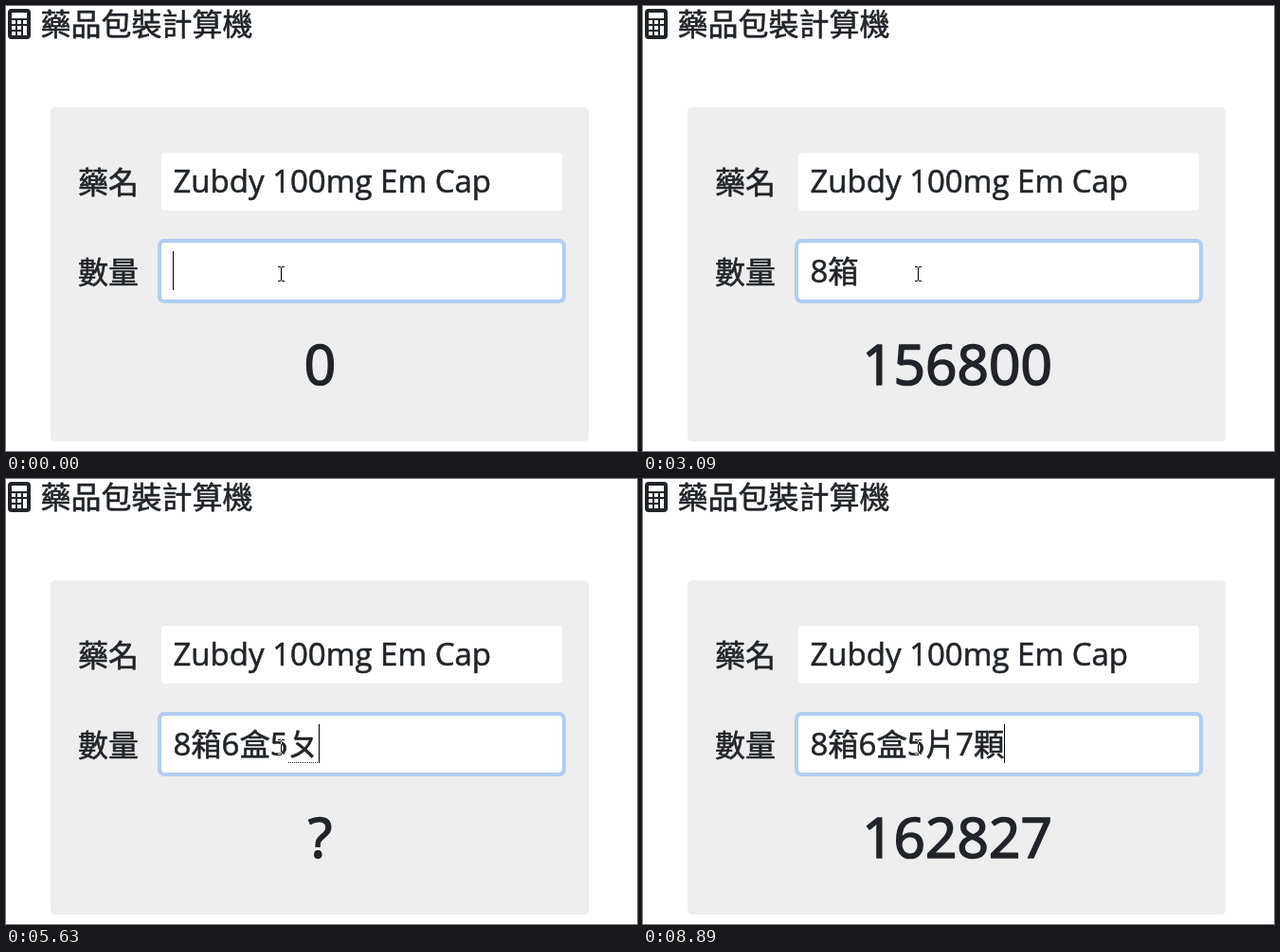
These frames come from a looping animation (666x470 px, 9020 ms). An HTML page:

```html
<!DOCTYPE html>
<html lang="zh-Hant">
<head>
<meta charset="utf-8">
<title>藥品包裝計算機</title>
<style>
  html, body { margin: 0; width: 100%; height: 100%; overflow: hidden; background: #fff; }
  svg { display: block; width: 666px; height: 470px; background: #fff; isolation: isolate; }
  /* A thin outline gives the text its medium weight. */
  text {
    fill: #212529; stroke: #212529; stroke-width: .6px; stroke-linejoin: round;
    font-family: "Open Sans", "Noto Sans CJK TC", "Noto Sans CJK", sans-serif;
  }
  .han { font-family: "Noto Sans CJK TC", "Noto Sans CJK", sans-serif; }
  .heading { font-size: 32px; }
  .field { font-size: 33px; }
  .field .han { font-size: 32.35px; }
  .result { font-size: 58.5px; stroke-width: 1.7px; text-anchor: middle; }
  .result .han { font-size: 56px; }
  .pointer { stroke: #fff; fill: none; mix-blend-mode: difference; }
</style>
</head>
<body>
<svg viewBox="0 0 666 470">
  <rect width="666" height="470" fill="#fff"/>
  <rect x="2" y="3" width="24" height="32" rx="4" fill="#212529"/>
  <path fill="#fff" d="M6 7h16v6h-16z
    M6 15h4v4h-4z M12 15h4v4h-4z M18 15h4v4h-4z
    M6 21h4v4h-4z M12 21h4v4h-4z M18 21h4v10h-4z
    M6 27h4v4h-4z M12 27h4v4h-4z"/>
  <text class="heading han" x="36.5" y="31">藥品包裝計算機</text>

  <rect x="47" y="107" width="568" height="353" rx="5" fill="#eee"/>
  <text class="heading han" x="76" y="198">藥名</text>
  <rect x="164" y="155" width="423" height="61" rx="4" fill="#fff"/>
  <text class="field" x="176.4" y="197">Zubdy 100mg Em Cap</text>

  <text class="heading han" x="76" y="293">數量</text>
  <rect x="160" y="246" width="431" height="68" rx="7" fill="#b3cdf1"/>
  <rect x="164" y="250" width="423" height="60" rx="4" fill="#fff"/>
  <text class="field" id="amount" x="176.4" y="292"></text>
  <path id="underline" stroke="#212529" stroke-dasharray="1 1"/>
  <rect id="caret" y="259" width="1" height="41" fill="#000"/>
  <text class="result" id="result" x="331.5" y="399.5"></text>
  <path class="pointer" d="M287 275.5h3m1 0h3M290.5 276v14M287 290.5h3m1 0h3"/>
</svg>
<script>
const LOOP = 9020;
const TEXT_X = 176.4;

// [start ms, committed text, text being composed, result, caret shown]
const steps = [
  [0, '', '', '0', 1],
  [70, '', '', '0', 0],
  [400, '8', '', '0', 1],
  [470, '8', '', '8顆', 1],
  [930, '8', '', '8顆', 0],
  [1480, '8', 'ㄒ', '8顆', 1],
  [1550, '8', 'ㄒ', '?', 1],
  [1680, '8', 'ㄒㄧ', '?', 1],
  [1950, '8', 'ㄒㄧㄤ', '?', 1],
  [2150, '8', '箱', '?', 1],
  [2280, '8', '箱', '156800', 1],
  [2560, '8箱', '', '156800', 1],
  [3090, '8箱', '', '156800', 0],
  [3290, '8箱6', '', '156800', 1],
  [3350, '8箱6', '', '?', 1],
  [3680, '8箱6', 'ㄏ', '?', 1],
  [3950, '8箱6', 'ㄏㄜ', '?', 1],
  [4150, '8箱6', '盒', '?', 1],
  [4280, '8箱6', '盒', '162680', 1],
  [4550, '8箱6盒', '', '162680', 1],
  [5090, '8箱6盒', '', '162680', 0],
  [5290, '8箱6盒5', '', '162680', 1],
  [5360, '8箱6盒5', '', '?', 1],
  [5630, '8箱6盒5', 'ㄆ', '?', 1],
  [5830, '8箱6盒5', 'ㄆㄧ', '?', 1],
  [5900, '8箱6盒5', 'ㄆㄧㄢ', '?', 1],
  [6100, '8箱6盒5', '片', '?', 1],
  [6230, '8箱6盒5', '片', '162820', 1],
  [6490, '8箱6盒5片', '', '162820', 1],
  [7040, '8箱6盒5片', '', '162820', 0],
  [7440, '8箱6盒5片7', '', '162820', 1],
  [7570, '8箱6盒5片7', '', '?', 1],
  [7970, '8箱6盒5片7', '', '?', 0],
  [8170, '8箱6盒5片7', 'ㄎ', '?', 1],
  [8300, '8箱6盒5片7', 'ㄎㄜ', '?', 1],
  [8430, '8箱6盒5片7', '顆', '?', 1],
  [8560, '8箱6盒5片7', '顆', '162827', 1],
  [8890, '8箱6盒5片7顆', '', '162827', 1],
];

const SVG = 'http://www.w3.org/2000/svg';
const [amount, underline, caret, result] =
  ['amount', 'underline', 'caret', 'result'].map(id => document.getElementById(id));

function setText(node, value) {
  const runs = value.match(/[\u3100-\u9fff]+|[^\u3100-\u9fff]+/g) || [];
  node.replaceChildren(...runs.map(run => {
    const span = document.createElementNS(SVG, 'tspan');
    if (run > '\u3100') span.setAttribute('class', 'han');
    span.textContent = run;
    return span;
  }));
}

function textEnd(value) {
  setText(amount, value);
  return Math.floor(TEXT_X + (value ? amount.getComputedTextLength() : 0));
}

function show([, committed, composing, total, caretShown]) {
  const start = textEnd(committed);
  const end = textEnd(committed + composing);
  underline.setAttribute('d', composing ? `M${start + 1} 299.5H${end - 1}` : '');
  caret.setAttribute('x', end);
  caret.setAttribute('visibility', caretShown ? 'visible' : 'hidden');
  setText(result, total);
}

const began = performance.now();
let shown;

function tick() {
  const time = (performance.now() - began) % LOOP;
  const step = steps.findLast(([start]) => start <= time);
  if (step !== shown) show(shown = step);
  requestAnimationFrame(tick);
}
tick();
</script>
</body>
</html>
```
